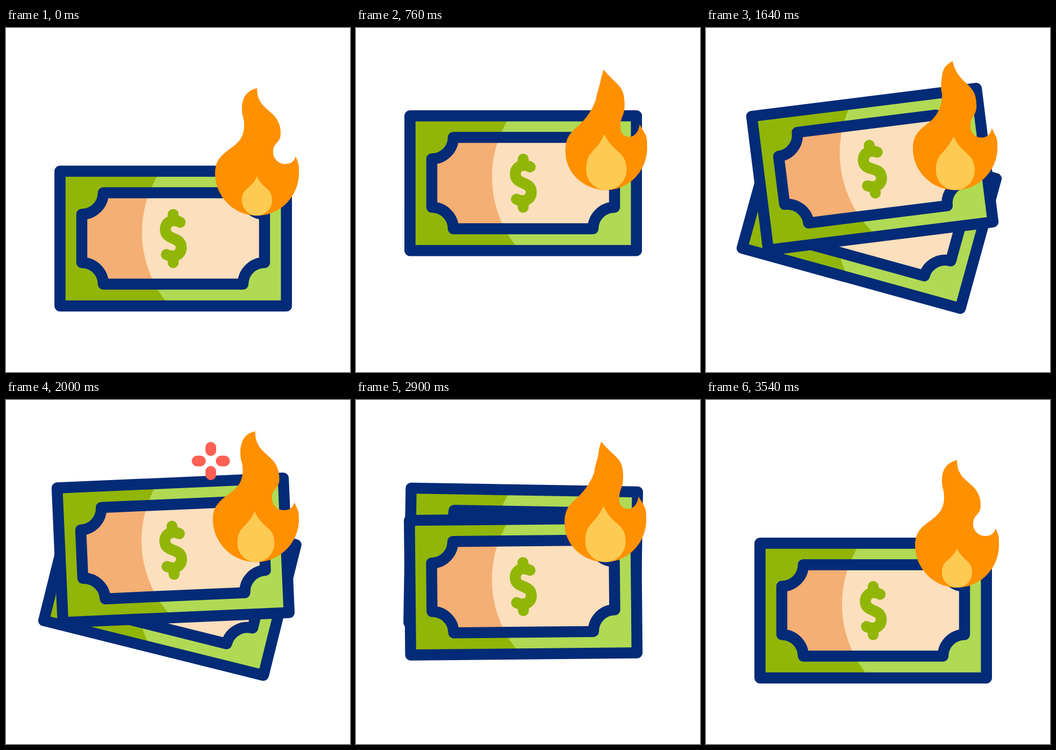
Recreate the animation shown at these times as an HTML page. Size 640 by 640 pixels, loop 3600 ms.

```html
<!DOCTYPE html>
<html lang="en">
<head>
<meta charset="utf-8">
<title>Burning money</title>
<style>
html, body { margin: 0; width: 100%; height: 100%; overflow: hidden; background: #fff; }
svg { display: block; width: 100vw; height: 100vh; }
</style>
</head>
<body>
<svg viewBox="0 0 640 640">
  <defs>
    <path id="panel" d="M181 306.5H441A40 40 0 0 0 481 346.5V436.5A40 40 0 0 0 441 476.5H181A40 40 0 0 0 141 436.5V346.5A40 40 0 0 0 181 306.5Z"/>
    <path id="shade" d="M100 266H287A208 208 0 0 0 304.5 517H100Z"/>
    <path id="edge" d="M100.5 266.5H521.7V517H100.5Z"/>
    <clipPath id="inPanel"><use href="#panel"/></clipPath>
    <g id="bill" stroke-width="20.5" stroke-linejoin="round" stroke-linecap="round">
      <use href="#edge" fill="#b0da53"/>
      <use href="#shade" fill="#91b608"/>
      <use href="#panel" fill="#fcdfbc"/>
      <g clip-path="url(#inPanel)"><use href="#shade" fill="#f5ae73"/></g>
      <g fill="none" stroke="#032b77">
        <use href="#panel"/>
        <use href="#edge"/>
      </g>
      <path d="M311 347V357M311 427V436.5M324 361.5C310 354 296.500 361 296.500 374.500C296.500 396 326 387 326 408.500C326 423 311 428 298.500 421.500" fill="none" stroke="#91b608"/>
    </g>
  </defs>
  <use id="back" href="#bill"/>
  <use id="front" href="#bill"/>
  <path id="flame" fill="#ff9000"/>
  <path id="core" fill="#fdca52"/>
  <path id="spark" fill="none" stroke="#ff6154" stroke-width="20" stroke-linecap="round"/>
</svg>
<script>
const LOOP = 3600;
const el = id => document.getElementById(id);
const clamp = u => Math.min(1, Math.max(0, u));

function ramp(t, a, b) {
  const u = clamp((t - a) / (b - a));
  return u * u * (3 - 2 * u);
}

// Eases 0 to 1 over a..b, holds, and eases back over c..d.
const pulse = (t, a, b, c, d) => ramp(t, a, b) - ramp(t, c, d);

// Smooth curve through points [x, y, heading in degrees].
function strand(pts) {
  let d = "";
  for (let i = 1; i < pts.length; i++) {
    const [x0, y0, h0] = pts[i - 1], [x1, y1, h1] = pts[i];
    const handle = deg => {
      const c = Math.cos(deg * Math.PI / 180), s = Math.sin(deg * Math.PI / 180);
      const len = 0.55 * Math.abs((x1 - x0) * c + (y1 - y0) * s);
      return [c * len, s * len];
    };
    const [ax, ay] = handle(h0), [bx, by] = handle(h1);
    d += `C${x0 + ax} ${y0 + ay} ${x1 - bx} ${y1 - by} ${x1} ${y1}`;
  }
  return d;
}

function drawBill(id, t, { delay, fall, land, peak, angle, dip }) {
  const lift = -103 * pulse(t, 220 + delay, 740, fall, land);
  const turn = angle * pulse(t, 760, peak, 2390, 2990) - dip * pulse(t, peak, 1945, 1945, 2390);
  el(id).setAttribute("transform", `translate(0 ${lift}) rotate(${turn} 100 391.7)`);
}

function drawFlame(t) {
  const lift = pulse(t, 220, 760, 2960, 3540);
  const curl = 1 - pulse(t, 220, 760, 1300, 1860) - pulse(t, 2000, 2400, 2960, 3540);
  const sway = -7 * pulse(t, 760, 1300, 1300, 2400) + 2 * pulse(t, 2000, 2400, 2400, 2900)
    - 4.5 * pulse(t, 2400, 2900, 2900, 3540);
  const rise = -8.5 * pulse(t, 900, 1820, 1820, 2350);
  const cx = 467 - 1.3 * lift, base = 349 - 47.5 * lift;
  const mix = (slim, curled) => slim + (curled - slim) * curl;

  // Places a point relative to the base, bending the upper part most.
  const place = ([x, y, heading]) => {
    const w = clamp(-y / 224) ** 3;
    return [cx + x + sway * (0.35 + 0.65 * w), base + y + rise * w, heading];
  };

  const r = 76 + 2 * curl * (1 + lift);
  const tip = [mix(-5, 0), mix(-224, -237)];
  const horn = [mix(62, 72), mix(-122, -110)];
  const outer = [
    [...tip, mix(108, 168)],
    [mix(-16, -28), mix(-183, -199), mix(107, 90)],
    [-24, mix(-157, -168), mix(116, 90)],
    [-r, mix(-71, -79), 90],
    [0, 0, 0],
    [r, -79, -90],
    [...horn, mix(-120, -112)]
  ].map(place);
  const inner = [
    [...horn, mix(98, 110)],
    [mix(42, 52), mix(-99, -96), 180],
    [mix(26, 30), mix(-115, -118), -90],
    [mix(34, 44), mix(-159, -153), -90],
    [...tip, mix(-130, -90)]
  ].map(place);
  el("flame").setAttribute("d", `M${outer[0][0]} ${outer[0][1]}` + strand(outer) + strand(inner) + "Z");

  const size = lift - 0.33 * pulse(t, 1300, 2000, 2400, 2900);
  const half = 28 + 9.5 * size, top = [-3.5 * size, -73 - 31 * size];
  const drop = [[...top, 115], [-half, -half, 90], [0, 0, 0], [half, -half, -90], [...top, -115]].map(place);
  el("core").setAttribute("d", `M${drop[0][0]} ${drop[0][1]}` + strand(drop) + "Z");
}

// Four dashes that shoot outwards, the tail chasing the head.
function sparkPath(t, x, y, start) {
  const u = (t - start) / 340;
  if (u <= 0 || u >= 1) return "";
  const head = 9 + 16.5 * ramp(u, 0, 0.6), tail = 9 + 16.4 * ramp(u, 0.15, 0.9);
  return [[1, 0], [-1, 0], [0, 1], [0, -1]].map(([i, j]) =>
    `M${x + i * tail} ${y + j * tail}L${x + i * head} ${y + j * head}`).join("");
}

function draw(t) {
  drawBill("front", t, { delay: 0, fall: 2660, land: 3092, peak: 1474, angle: -9.1, dip: -6.9 });
  drawBill("back", t, { delay: 60, fall: 2885, land: 3310, peak: 1466, angle: 16.1, dip: 2.2 });
  drawFlame(t);
  el("spark").setAttribute("d", sparkPath(t, 381, 113.5, 1800) + sparkPath(t, 537.5, 121.5, 3200));
}

const begin = performance.now();
function tick() {
  draw((performance.now() - begin) % LOOP);
  requestAnimationFrame(tick);
}
tick();
</script>
</body>
</html>
```
